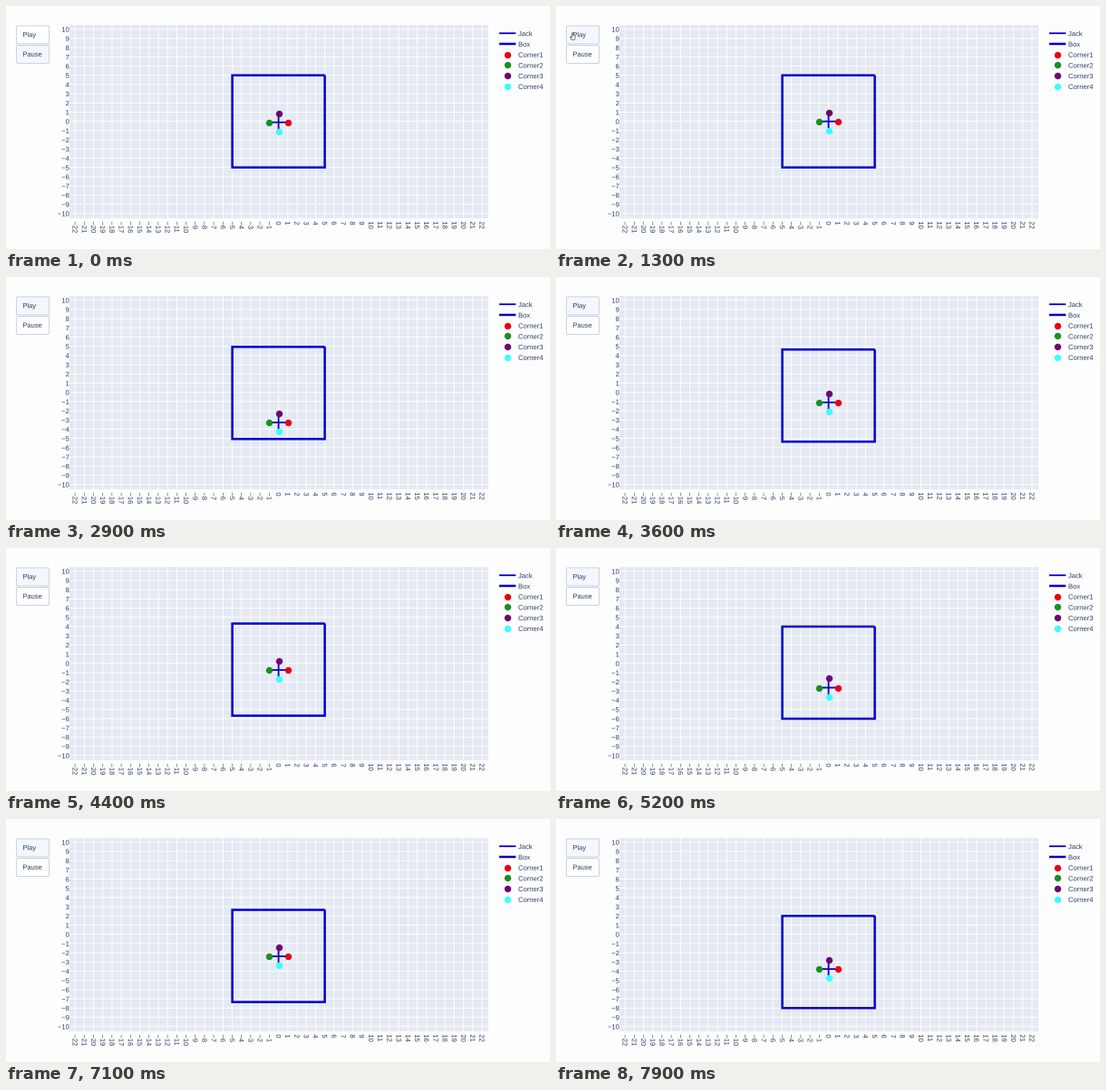
Animation of 600x269 px, one loop 8 s. Source, as a matplotlib script:

```python
import matplotlib.pyplot as plt
import numpy as np
from matplotlib.animation import FuncAnimation
from matplotlib.patches import FancyBboxPatch, PathPatch, Polygon, Rectangle
from matplotlib.textpath import TextPath
from matplotlib.transforms import Affine2D

W, H, DPI = 600, 269, 64
FRAMES, STEP = 80, 100
PT = 72 / DPI  # points per pixel

FONT, SIZE = {"family": "Liberation Sans"}, 7.6
INK, BLUE = "#2a3f5f", "#0600cd"
ACTIVE, IDLE = "#f4f8fd", "#fefefe"
CORNERS = [("#ea0014", 1, 0), ("#1b8f22", -1, 0),
           ("#6e0673", 0, 1), ("#3cfdff", 0, -1)]

X0, Y0, UNIT = 300.6, 127.7, 10.2
LEFT, RIGHT, TOP, BOTTOM = 70, 532, 20.8, 234.8
THIN, THICK, DOT = 1.8, 2.5, 7.4

# Jack bouncing elastically on the floor of a much heavier box
CLICK, DROP = 1.0, 1.243     # s
HALF, FALL = 1.5, 4.0        # fall time (s) and clearance
KICK = 0.41                  # box speed gained per impact


def px(x):
    return X0 + UNIT * np.asarray(x, float)


def py(y):
    return Y0 - UNIT * np.asarray(y, float)


def heights(t):
    """Jack and box centres at time t, in plot units."""
    if t < CLICK:
        return -0.1, 0.0
    s = max(t - DROP, 0)
    box, hit = 0.0, HALF
    while hit < s:
        box -= KICK * (s - hit)
        hit += 2 * HALF
    phase = (s + HALF) % (2 * HALF) - HALF
    return box - FALL + FALL * (1 - (phase / HALF) ** 2), box


def label(x, y, text, angle=0, right=False):
    """Text outline placed at subpixel accuracy, centred across its line."""
    path = TextPath((0, 0), text, size=SIZE, prop=FONT)
    shift = -path.get_extents().x1 if right else 0
    place = (Affine2D().translate(shift, -0.35 * SIZE).scale(1, -1)
             .rotate_deg(angle).translate(x, y))
    ax.add_patch(PathPatch(place.transform_path(path), fc=INK, lw=0,
                           snap=False, zorder=5))


def tick(v):
    return str(v).replace("-", "\u2212")


def line(x, y, width):
    return ax.plot(x, y, color=BLUE, lw=width * PT, solid_capstyle="butt",
                   solid_joinstyle="miter", snap=False, zorder=3)[0]


def dot(x, y, color):
    return ax.plot([x], [y], "o", ms=DOT * PT, mew=0, color=color,
                   snap=False, zorder=4)[0]


def button(y, text):
    patch = FancyBboxPatch((11.4, y), 36.2, 20,
                           boxstyle="round,pad=0,rounding_size=1.5",
                           fc=IDLE, ec="#c6cfdd", lw=0.9 * PT)
    ax.add_patch(patch)
    label(18.3, y + 9.7, text)
    return patch


fig = plt.figure(figsize=(W / DPI, H / DPI), dpi=DPI, facecolor="#fdfdfe")
ax = fig.add_axes([0, 0, 1, 1])
ax.set_xlim(0, W)
ax.set_ylim(H, 0)
ax.axis("off")

# Plot area, grid and tick labels
ax.add_patch(Rectangle((LEFT, TOP), RIGHT - LEFT, BOTTOM - TOP,
                       fc="#e4e9f3", lw=0, zorder=0))
xs, ys = np.arange(-22, 23), np.arange(-10, 11)
grid = dict(colors="white", lw=0.9 * PT, snap=False, zorder=1)
ax.vlines(px(xs), TOP, BOTTOM, **grid)
ax.hlines(py(ys), LEFT, RIGHT, **grid)
for v in xs:
    label(px(v), 238.4, tick(v), angle=90)
for v in ys:
    label(69.5, py(v) + 0.2, tick(v), right=True)

# Legend
for i, name in enumerate(["Jack", "Box"] + [f"Corner{n}" for n in range(1, 5)]):
    y = 30.2 + 11.75 * i
    label(565, y + 0.3, name)
    if i < 2:
        line([544, 562.3], [y, y], (THIN, THICK)[i])
    else:
        dot(553.1, y, CORNERS[i - 2][0])

play, pause = button(21.9, "Play"), button(43.5, "Pause")

box_line = line([], [], THICK)
jack_lines = [line([], [], THIN) for _ in range(2)]
dots = [dot(0, 0, c) for c, _, _ in CORNERS]

HAND = np.array([(0, 0), (0.9, 0), (1.1, 2.6), (3.3, 3.4), (3.4, 5.4),
                 (2.6, 7.6), (-0.6, 7.6), (-2.3, 4.6), (-1.5, 4.2), (-0.3, 5.2)])
hand = Polygon(HAND, closed=True, fc="white", ec="#4a4a4a",
               lw=0.7 * PT, zorder=6)
ax.add_patch(hand)


def draw(frame):
    t = frame * STEP / 1000
    jack, box = heights(t)

    box_line.set_data(px([5, -5, -5, 5, 5]),
                      py(box + np.array([5, 5, -5, -5, 5])))
    jack_lines[0].set_data(px([-1, 1]), py([jack, jack]))
    jack_lines[1].set_data(px([0, 0]), py([jack - 1, jack + 1]))
    for d, (_, dx, dy) in zip(dots, CORNERS):
        d.set_data([px(dx)], [py(jack + dy)])

    started = t >= CLICK
    play.set_facecolor(ACTIVE if started else IDLE)
    pause.set_facecolor(IDLE if started else ACTIVE)

    hand.set_visible(0.4 <= t <= 1.55)
    away = np.interp(t, [0.3, 0.7, 1.3, 1.6], [1, 0, 0, 1])
    hand.set_xy(HAND + (17.8 + 22 * away, 29.8 + 22 * away))
    return []


anim = FuncAnimation(fig, draw, frames=FRAMES, interval=STEP,
                     repeat=True, repeat_delay=0, blit=False)
plt.show()
```
